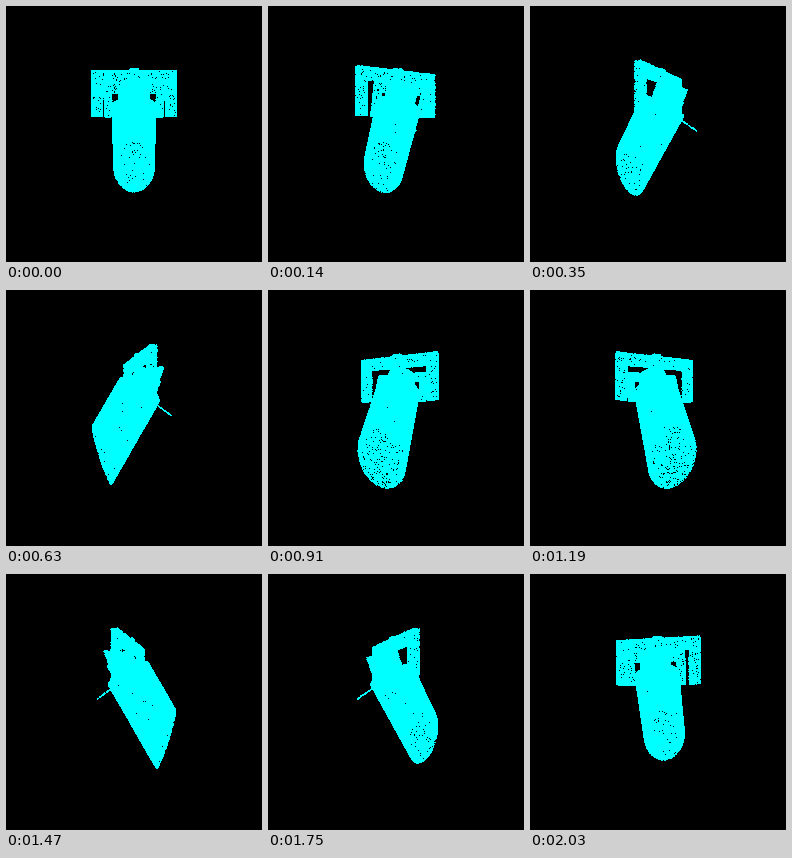
Write an HTML page with a canvas that moves like this. It is 256 by 256 pixels and loops after 2.1 s.

```html
<!DOCTYPE html>
<html>
<head>
<meta charset="utf-8">
<style>
html, body { margin: 0; width: 100%; height: 100%; overflow: hidden; background: #000; }
canvas { display: block; }
</style>
</head>
<body>
<canvas width="256" height="256"></canvas>
<script>
const SIZE = 256, MID = 128, DISTANCE = 240;
const STEP = 70, STEPS = 30;
const CYAN = 0xffffff00, BLACK = 0xff000000;
const ctx = document.querySelector('canvas').getContext('2d');
const image = ctx.createImageData(SIZE, SIZE);
const pixels = new Uint32Array(image.data.buffer);
const points = [];

let seed = 7;
function random() {
  seed = (Math.imul(seed, 1664525) + 1013904223) >>> 0;
  return seed / 4294967296;
}
const mix = (a, b, t) => a + (b - a) * t;

// Scatter points over the six faces of a box; lean shifts depth with height.
function box(min, max, density, lean = () => 0) {
  for (let axis = 0; axis < 3; axis++) {
    const [a, b] = [0, 1, 2].filter(i => i !== axis);
    const count = (max[a] - min[a]) * (max[b] - min[b]) * density;
    for (const face of [min, max]) {
      for (let i = 0; i < count; i++) {
        const p = min.map((low, k) => mix(low, max[k], random()));
        p[axis] = face[axis];
        p[2] += lean(p[1]);
        points.push(p);
      }
    }
  }
}

function bracket(outer, inner, top, under, bottom, near, far, density, lean) {
  box([-outer, top, near], [outer, under, far], density, lean);
  box([-outer, under, near], [-inner, bottom, far], density, lean);
  box([inner, under, near], [outer, bottom, far], density, lean);
}

// Elliptical ends of the slanted body and of its narrower neck.
const lower = { r: 23.2, y: 35.5, z: -32.5, vy: 28.5, vz: 8.5 };
const upper = { r: 21.3, y: -28, z: 6, vy: 11.5, vz: 20 };
const neckLow = { r: 14.5, y: -26, z: 5.5, vy: 8, vz: 11.5 };
const neckTop = { r: 14.5, y: -43, z: 15.5, vy: 8, vz: 11.5 };

function onEnd(end, angle, radius = 1) {
  const c = Math.cos(angle) * radius, s = Math.sin(angle) * radius;
  return [end.r * c, end.y + end.vy * s, end.z + end.vz * s];
}

function tube(from, to, count) {
  for (let i = 0; i < count; i++) {
    const angle = random() * 2 * Math.PI, t = random();
    const a = onEnd(from, angle), b = onEnd(to, angle);
    points.push(a.map((v, k) => mix(v, b[k], t)));
  }
}

function disc(end, count) {
  for (let i = 0; i < count; i++) {
    points.push(onEnd(end, random() * 2 * Math.PI, Math.sqrt(random())));
  }
}

function rod(count) {
  for (let i = 0; i < count; i++) {
    const t = random();
    points.push([random() * 2 - 1, mix(-14, -2.7, t) + random() - 0.5, mix(24, 41, t)]);
  }
}

bracket(41.5, 31.4, -62, -51, -17.3, 1, 7, 1.5);
bracket(28.3, 21, -46.7, -38, -16.5, -4, 0, 1.5, y => 20 - (y + 47) * 12 / 31);
box([-4, -64, 1], [4, -62, 6], 1.5);
tube(lower, upper, 28000);
tube(neckLow, neckTop, 4500);
disc(lower, 600);
disc(upper, 2500);
disc(neckTop, 1000);
rod(150);

function draw(angle) {
  const c = Math.cos(angle), s = Math.sin(angle);
  pixels.fill(BLACK);
  for (const [x, y, z] of points) {
    const scale = DISTANCE / (DISTANCE + x * s - z * c);
    const px = Math.floor(MID + (x * c + z * s) * scale);
    const py = Math.floor(MID + y * scale);
    pixels[py * SIZE + px] = CYAN;
  }
  ctx.putImageData(image, 0, 0);
}

const start = performance.now();
let shown = -1;
function tick() {
  const step = Math.floor((performance.now() - start) / STEP) % STEPS;
  if (step !== shown) {
    shown = step;
    draw(step / STEPS * 2 * Math.PI);
  }
  requestAnimationFrame(tick);
}
tick();
</script>
</body>
</html>
```
